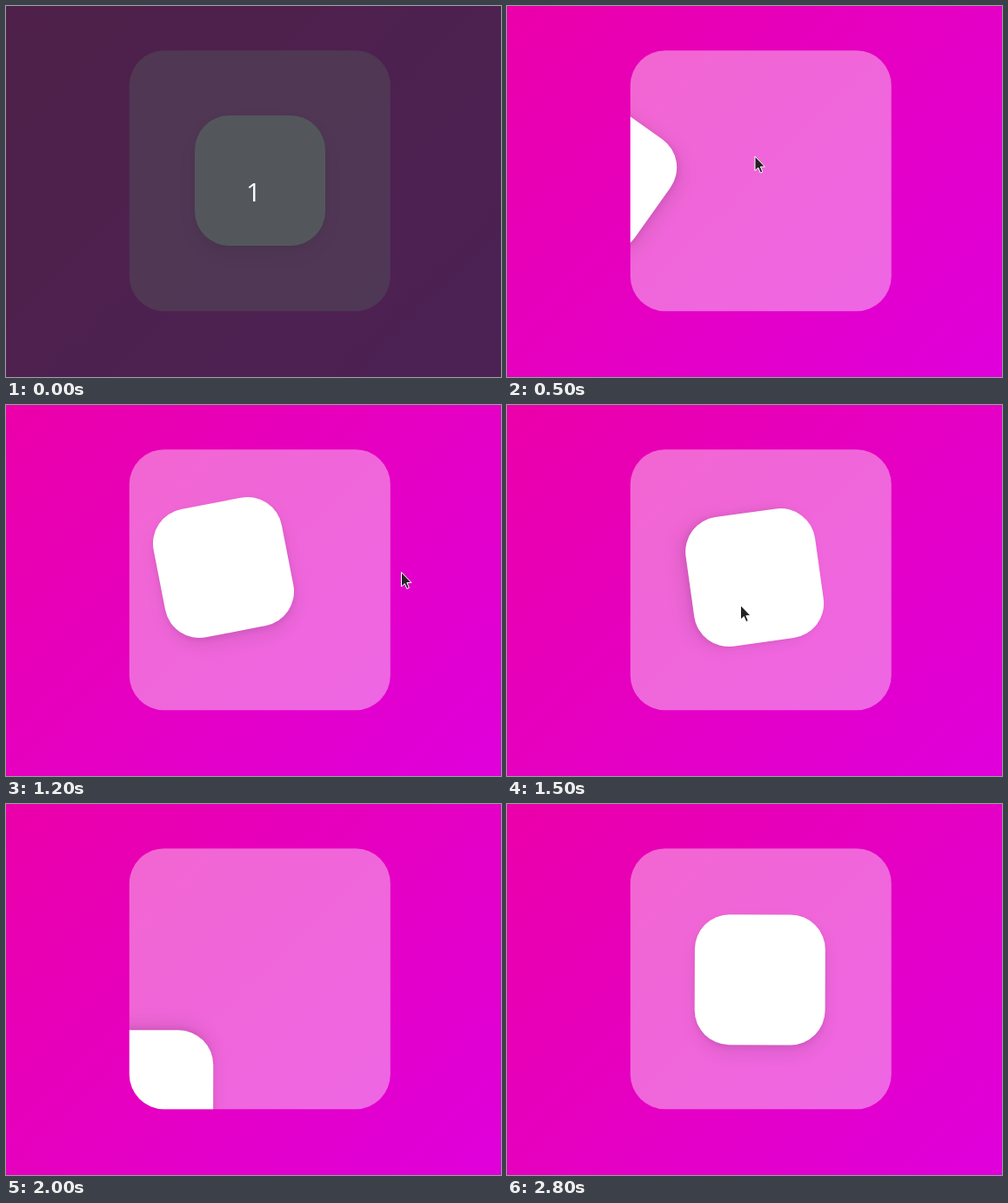
An HTML page for the animation above (2.9 s loop, 569 px wide and 427 px high).

```html
<!DOCTYPE html>
<html lang="en">
<head>
<meta charset="utf-8">
<title>Fly-away card</title>
<style>
  html, body { margin: 0; width: 100%; height: 100%; overflow: hidden; background: #e500c2; }
  svg { display: block; width: 100vw; height: 100vh; }
  text { font: 30px "Open Sans", "Noto Sans", sans-serif; }
</style>
</head>
<body>
<svg viewBox="0 0 569 427">
  <defs>
    <linearGradient id="sky" gradientUnits="userSpaceOnUse" x1="35.5" y1="-35.5" x2="533.5" y2="462.5">
      <stop stop-color="#eb00a9"/>
      <stop offset="1" stop-color="#df00db"/>
    </linearGradient>
    <clipPath id="frame"><rect x="141.8" y="51.2" width="300" height="300" rx="40"/></clipPath>
    <filter id="soft" x="-30%" y="-30%" width="160%" height="160%"><feGaussianBlur stdDeviation="10"/></filter>
    <filter id="tight" x="-30%" y="-30%" width="160%" height="160%"><feGaussianBlur stdDeviation="3"/></filter>
    <rect id="tile" x="-75" y="-75" width="150" height="150" rx="40"/>
  </defs>
  <rect width="569" height="427" fill="url(#sky)"/>
  <g clip-path="url(#frame)">
    <rect width="569" height="427" fill="#fff" fill-opacity=".4"/>
    <g id="card">
      <g filter="url(#soft)" opacity=".07"><use href="#tile" y="10"/></g>
      <g filter="url(#tight)" opacity=".07"><use href="#tile" y="3"/></g>
      <use href="#tile" fill="#fff"/>
    </g>
  </g>
  <path id="cursor" d="M.5 .5V17L4.3 13.6L6.8 19.5L9.4 18.4L6.9 12.5H12Z" fill="#222" stroke="#fff"/>
  <g id="intro">
    <rect width="569" height="427" fill="#262b31" fill-opacity=".79"/>
    <text x="284.5" y="224.5" text-anchor="middle" fill="#fff">1</text>
  </g>
</svg>
<script>
const LOOP = 2900, STEP = 100;
const TAU = 172;        // time constant of every flight
const SPIN_LEAD = 45;   // the turn starts a little before the move
const [card, cursor, intro] = ["card", "cursor", "intro"].map(id => document.getElementById(id));

const decay = age => Math.exp(-Math.max(0, age) / TAU);
const mix = (a, b, k) => a + (b - a) * k;
const easeOut = k => 1 - (1 - k) ** 2;
const smooth = k => k * k * (3 - 2 * k);

// The card leaves towards one pose and comes home from another: x, y, degrees
const flights = [
  { leave: 300, back: 880, out: [-270, -10, -72], home: [-270, -90, -180] },
  { leave: 1500, back: 1880, out: [-258, 270, 360], home: [-258, 270, 513] }
];

function flightPose(t, { leave, back, out, home }) {
  const away = t >= back ? decay(t - back) : 1 - decay(t - leave);
  const spin = t >= back ? away ** 1.5 : 1 - decay(t - leave + SPIN_LEAD);
  const [x, y, turn] = t >= back ? home : out;
  return [x * away, y * away, turn * spin];
}

// Pointer strokes, each resting at its end until the given time
const strokes = [
  { start: 300, end: 700, rest: 700, from: [361, 198], to: [259, 164], ease: easeOut },
  { start: 700, end: 900, rest: 1300, from: [259, 164], to: [454, 192], ease: smooth },
  { start: 1300, end: 1500, rest: 1500, from: [454, 192], to: [268, 230], ease: smooth },
  { start: 1500, end: 1800, rest: 1900, from: [268, 230], to: [160, 331], ease: easeOut },
  { start: 2100, end: 2500, rest: 2500, from: [77, 366], to: [92, 35], ease: smooth }
];

function pointerAt(t) {
  const stroke = strokes.find(s => t >= s.start && t <= s.rest);
  if (!stroke) return null;
  const { start, end, from, to, ease } = stroke;
  const k = ease(Math.min(1, (t - start) / (end - start)));
  return from.map((a, i) => mix(a, to[i], k));
}

function draw(t) {
  const poses = flights.map(flight => flightPose(t, flight));
  const [x, y, turn] = [0, 1, 2].map(i => poses.reduce((sum, pose) => sum + pose[i], 0));
  card.setAttribute("transform", `translate(${292 + x} ${201 + y}) rotate(${turn})`);
  const tip = pointerAt(t);
  cursor.style.display = tip ? "" : "none";
  if (tip) cursor.setAttribute("transform", `translate(${tip})`);
  intro.style.display = t < STEP ? "" : "none";
}

const begin = performance.now();
function tick() {
  const t = (performance.now() - begin) % LOOP;
  draw(Math.floor(t / STEP) * STEP);
  requestAnimationFrame(tick);
}
tick();
</script>
</body>
</html>
```
